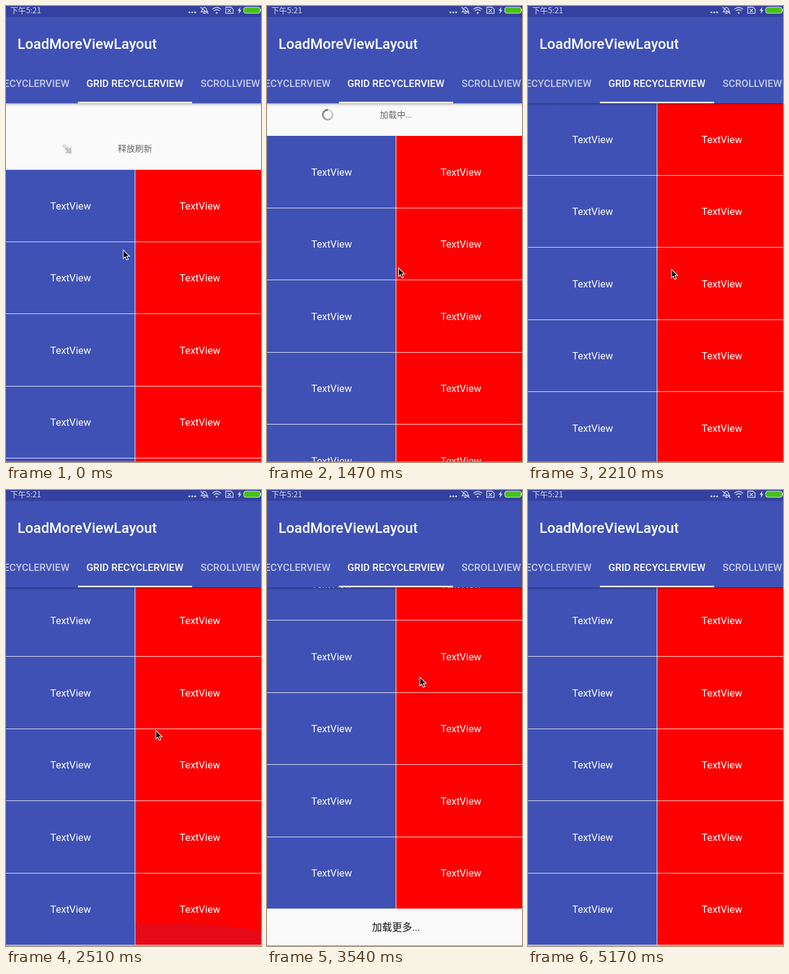
These frames come from a looping animation (422x755 px, 5270 ms). An HTML page:

```html
<!DOCTYPE html>
<html lang="zh">
<head>
<meta charset="utf-8">
<title>LoadMoreViewLayout</title>
<style>
  html, body { margin: 0; width: 100%; height: 100%; overflow: hidden; background: #fafafb; }
  svg { display: block; }
  text { font-family: Roboto, "Noto Sans CJK SC", "Noto Sans CJK", sans-serif; }
  .mid { text-anchor: middle; }
  .cell { font-size: 16.6px; fill: #fff; }
  .tab { font-size: 16.6px; font-weight: 500; fill: #fff; }
  .dim { fill: #c5cbe9; }
  .title { font-size: 23.7px; font-weight: 500; fill: #fff; }
  .hint { font-size: 14.2px; fill: #666; }
  .more { font-size: 16.6px; fill: #111; }
  .clock { font-family: "Noto Sans CJK SC", "Noto Sans CJK", sans-serif; font-size: 13px; fill: #d3d7ec; }
  .rule { fill: #fff; fill-opacity: .85; shape-rendering: crispEdges; }
  .icon { fill: none; stroke: #d3d7ec; stroke-width: 1.3; stroke-linecap: round; }
</style>
</head>
<body>
<svg width="422" height="755" viewBox="0 0 422 755">
  <defs>
    <clipPath id="view"><rect y="161" width="422" height="594"/></clipPath>
    <linearGradient id="shade" x2="0" y2="1">
      <stop stop-opacity=".3"/><stop offset=".4" stop-opacity=".1"/><stop offset="1" stop-opacity="0"/>
    </linearGradient>
  </defs>
  <rect width="422" height="755" fill="#fafafb"/>

  <g clip-path="url(#view)">
    <g id="list">
      <g id="arrow" transform="translate(102 -33.5) rotate(-45)" fill="#c6c6c6">
        <path d="M-3-10.5h6v1.4h-6zM-3-7.6h6v1.8h-6zM-3-4.5h6v5h4.5L0 9.5-7.5.5H-3z"/>
      </g>
      <g id="spinner" fill="none" stroke-width="3"></g>
      <text id="hint" class="hint mid" x="213.5" y="-30"></text>
      <g id="rows"></g>
      <g transform="translate(0 597)">
        <rect width="422" height="80" fill="#fafafa"/>
        <text id="more" class="more mid" x="213.5" y="36.5"></text>
      </g>
    </g>
    <ellipse id="glow" cx="235" cy="787" rx="330" ry="70" fill="#3f51b5"/>
    <rect y="161" width="422" height="6" fill="url(#shade)"/>
  </g>
  <rect y="754" width="422" height="1" fill="#5b9bd5"/>

  <rect width="422" height="161" fill="#3f51b5"/>
  <rect width="422" height="18" fill="#3541a0"/>
  <text class="title" x="19" y="71">LoadMoreViewLayout</text>
  <text class="tab dim" x="105" y="134" text-anchor="end">RECYCLERVIEW</text>
  <text class="tab" x="133" y="134">GRID RECYCLERVIEW</text>
  <text class="tab dim" x="322" y="134">SCROLLVIEW</text>
  <rect x="119" y="158.6" width="189" height="2.4" fill="#fff"/>

  <text class="clock" x="7" y="11.7">下午5:21</text>
  <g fill="#d3d7ec">
    <circle cx="303.5" cy="10.5" r="1.6"/><circle cx="308.3" cy="10.5" r="1.6"/><circle cx="313" cy="10.5" r="1.6"/>
    <path d="M388 1.5l-4.8 6.2h2.7l-1 5.3 4.8-6.5h-2.7z"/>
    <circle cx="348.7" cy="11.2" r="1.5"/>
  </g>
  <g class="icon">
    <path d="M323 9.5c1.8-1.2 1.5-6.5 5.5-7.3 3.5.4 3.5 5.6 5.2 7.3zM326.5 12h3.5M322 2l12.5 10.5"/>
    <path d="M342 5q6.7-5.5 13.4 0M344.3 7.7q4.4-3.4 8.8 0"/>
    <path d="M363.7 2h8.8l3.3 3.2v7h-12.1zM367.3 5.2l4.6 4.6M371.9 5.2l-4.6 4.6"/>
  </g>
  <rect x="393.5" y="2" width="27" height="10" rx="3" fill="#45c01a" stroke="#dfe6dc"/>
  <rect x="421" y="5" width="1" height="4" fill="#dfe6dc"/>

  <path id="cursor" d="M0 0V14.2L3.3 11.2 5.7 16.6 8.2 15.5 5.8 10.3H10.4Z" fill="#000" stroke="#fff" stroke-width="1.1"/>
</svg>
<script>
  const LOOP = 5270, STEP = 147.7, ROW = 119.4;
  const $ = id => document.getElementById(id);

  // Keys are [step, value...]; values run straight between them.
  const tracks = {
    top: [[0, 271.2], [1, 256], [2, 237], [3, 231.8], [9, 231.8], [10, 215], [11, 186],
          [12, 162.6], [13, 161], [16, 161], [17, 156.6], [18, 156.6], [23, 96.6],
          [30, 96.6], [31, 98.6], [32, 133.5], [33, 152], [34, 156.6]],
    cursor: [[0, 194, 404], [6, 210, 398], [8, 210, 398], [12, 225, 469], [14, 232, 455],
             [17, 248, 398], [23, 253, 310], [25, 253, 310], [28, 440, 330]],
    glow: [[16, 0], [17, .13], [19, 0]]
  };

  function sample(keys, s) {
    const i = keys.findIndex(k => k[0] > s);
    if (i < 0) return keys[keys.length - 1].slice(1);
    if (i === 0) return keys[0].slice(1);
    const [a, b] = [keys[i - 1], keys[i]];
    const p = (s - a[0]) / (b[0] - a[0]);
    return a.slice(1).map((v, j) => v + (b[j + 1] - v) * p);
  }

  function buildRows() {
    let out = `<rect width="213.5" height="597" fill="#3f51b5"/>
      <rect x="213.5" width="208.5" height="597" fill="#f00"/>
      <rect class="rule" x="213" width="1" height="597"/>`;
    for (let i = 0; i < 5; i++) {
      const y = i * ROW;
      for (const x of [107, 321])
        out += `<text class="cell mid" x="${x}" y="${y + 65.9}">TextView</text>`;
      out += `<rect class="rule" y="${y + ROW - .7}" width="422" height="1"/>`;
    }
    $('rows').innerHTML = out;
  }

  function buildSpinner() {
    const n = 30, r = 8;
    const at = a => `${r * Math.cos(a)} ${r * Math.sin(a)}`;
    let out = '';
    for (let i = 0; i < n; i++) {
      const a = i / n * 2 * Math.PI, c = 225 - 115 * i / n;
      out += `<path d="M${at(a)}A${r} ${r} 0 0 1 ${at(a + .24)}" stroke="rgb(${c},${c},${c})"/>`;
    }
    $('spinner').innerHTML = out;
  }

  function setText(el, s) {
    if (el.textContent !== s) el.textContent = s;
  }

  function draw() {
    const t = performance.now() % LOOP;
    const s = Math.min(35, Math.floor((t + 13) / STEP));
    const loading = s >= 1;
    const [x, y] = sample(tracks.cursor, s);
    $('list').setAttribute('transform', `translate(0 ${sample(tracks.top, s)[0]})`);
    $('cursor').setAttribute('transform', `translate(${x} ${y})`);
    $('glow').setAttribute('opacity', sample(tracks.glow, s)[0]);
    $('arrow').setAttribute('visibility', loading ? 'hidden' : 'visible');
    $('spinner').setAttribute('visibility', loading ? 'visible' : 'hidden');
    $('spinner').setAttribute('transform', `translate(100.5 -35) rotate(${60 + (s - 6) * 53})`);
    setText($('hint'), loading ? '加载中...' : '释放刷新');
    setText($('more'), s < 30 ? '加载更多...' : '加载成功');
    requestAnimationFrame(draw);
  }

  buildRows();
  buildSpinner();
  draw();
</script>
</body>
</html>
```
